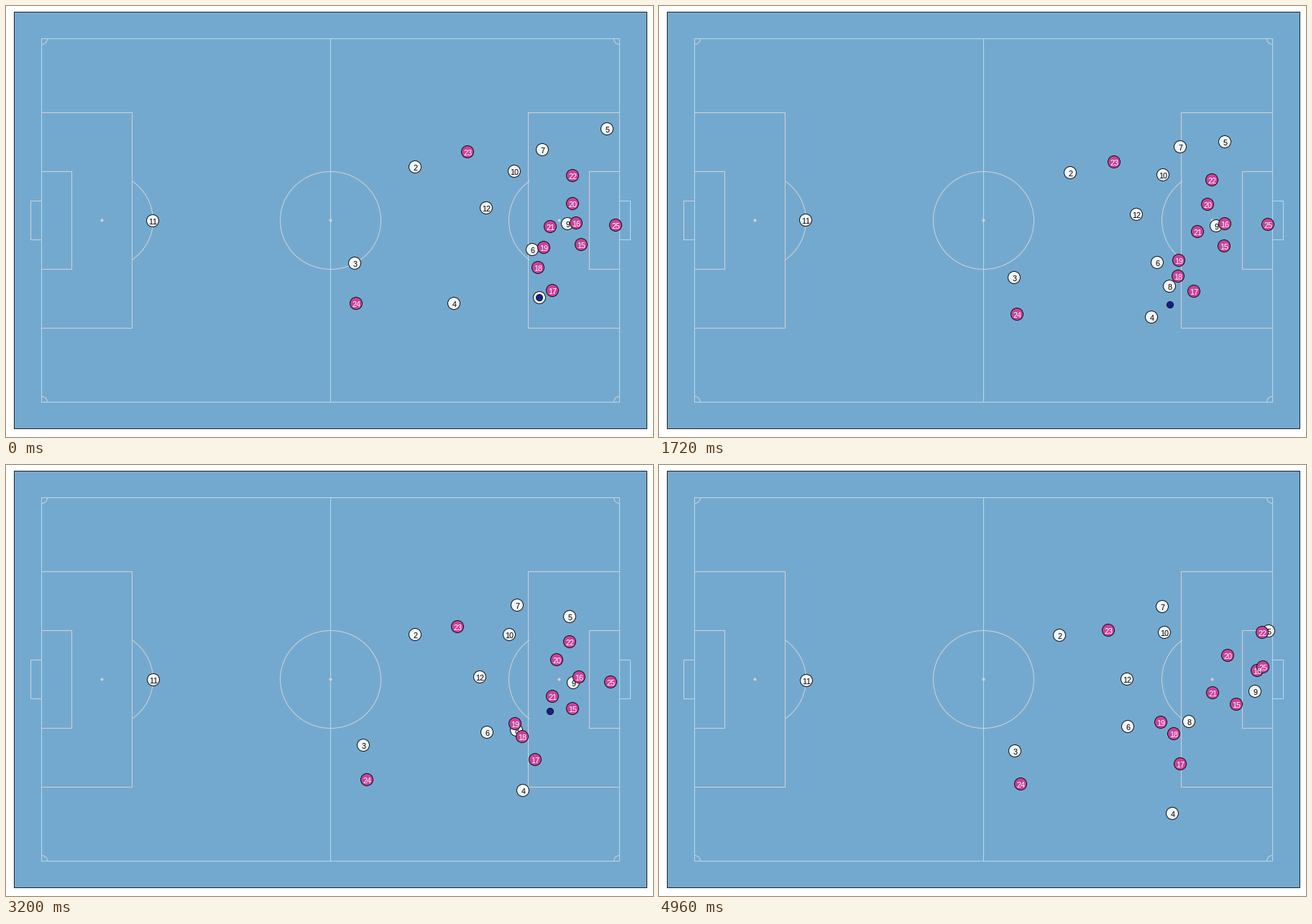
These frames come from a looping animation (900x600 px, 5 s). A matplotlib script:

```python
import matplotlib.pyplot as plt
import numpy as np
from matplotlib.animation import FuncAnimation
from matplotlib.patches import Arc, Circle, Rectangle

plt.rcParams["font.family"] = "Liberation Sans"
plt.rcParams["text.hinting"] = "native"
plt.rcParams["text.hinting_factor"] = 1

W, H, DPI = 900, 600, 100
FRAMES, INTERVAL = 125, 40
PX = 72 / DPI

GRASS = "#74a9cf"
GREY = "#d3d3d3"
PALE = "#b4dcee"
WHITE = "#f1f6fb"
PINK = "#c9429b"
NAVY = "#14208c"
EDGE = "#101010"

# Shirt number -> waypoints, passed at equal intervals over the loop.
ATTACK = {
    2: [(569, 224), (571, 234), (557, 237)],
    3: [(485, 358), (496, 385), (495, 398)],
    4: [(623, 414), (683, 432), (720, 455), (714, 485)],
    5: [(836, 171), (801, 184), (776, 199), (799, 220), (848, 231)],
    6: [(732, 339), (694, 356), (668, 373), (652, 364)],
    7: [(746, 200), (717, 195), (700, 197)],
    8: [(742, 406), (711, 391), (711, 368), (737, 357)],
    9: [(781, 303), (775, 306), (791, 303), (829, 315)],
    10: [(707, 230), (700, 236), (703, 233)],
    11: [(204, 298.7), (204.45, 298.5), (205, 299.8)],
    12: [(668, 281), (661.5, 292.5), (651, 298)],
}
DEFENCE = {
    15: [(800, 332), (786, 333.5), (789, 339.5), (803, 333)],
    16: [(793, 302), (790, 302), (787, 301), (808, 290), (832, 286)],
    17: [(760, 396), (744, 397), (735, 411), (725, 416)],
    18: [(740, 364), (722, 376), (718, 378), (716, 374)],
    19: [(748, 336), (714, 358), (698, 358)],
    20: [(788, 275), (763, 276), (767, 270.5), (791, 265)],
    21: [(757, 307), (749, 314), (761, 322), (770, 317)],
    22: [(788, 236), (769, 242), (786, 246), (839, 233)],
    23: [(642, 203), (630, 221.5), (625, 230)],
    24: [(487, 414), (500.5, 434), (503, 444)],
    25: [(848, 305), (847, 303.5), (841, 301), (840, 281)],
}

fig = plt.figure(figsize=(W / DPI, H / DPI), dpi=DPI, facecolor="white")
ax = fig.add_axes([0, 0, 1, 1])
ax.set_xlim(0, W)
ax.set_ylim(H, 0)
ax.axis("off")


# ---------- pitch ----------
def box(x0, y0, x1, y1, edge, face="none"):
    ax.add_patch(Rectangle((x0 + 0.5, y0 + 0.5), x1 - x0, y1 - y0, facecolor=face,
                           edgecolor=edge, linewidth=PX, snap=False, zorder=1))


def arc(x, y, rx, ry, start=0, end=360):
    ax.add_patch(Arc((x + 0.5, y + 0.5), 2 * rx, 2 * ry, theta1=start, theta2=end,
                     color=GREY, linewidth=PX, zorder=1))


def draw_pitch():
    box(11, 8, 891, 588, "#202020", GRASS)
    box(49, 148, 175, 448, GREY)
    box(726, 148, 853, 448, GREY)
    box(49, 230, 91, 366, GREY)
    box(811, 230, 853, 366, GREY)
    box(34, 271, 49, 325, GREY)
    box(853, 271, 868, 325, PALE)
    box(49, 45, 853, 551, PALE)
    ax.plot([451.5, 451.5], [45.5, 551.5], color=PALE, linewidth=PX, snap=False, zorder=1)
    arc(451, 298, 70, 68)
    arc(133, 298, 71, 68, -53, 53)
    arc(769, 298, 70, 68, 127, 233)
    for i, (x, y) in enumerate([(49, 45), (853, 45), (853, 551), (49, 551)]):
        arc(x, y, 8, 8, 90 * i, 90 * i + 90)
    for x in (133, 451, 769):
        ax.add_patch(Circle((x + 0.5, 298.5), 2, color=GREY, linewidth=0, zorder=1))


# ---------- motion ----------
def run(points):
    """Polynomial path through evenly timed points, one row per frame."""
    n = len(points)
    coeffs = np.polyfit(np.linspace(0, 1, n), points, n - 1)
    t = np.linspace(0, 1, FRAMES)
    return np.column_stack([np.polyval(c, t) for c in coeffs.T])


def ball_run(dribbler, keeper):
    """Dribble, pass, cross, header: straight lines between touches."""
    path = dribbler.copy()
    touches = [31, 57, 59, 104, 118]
    spots = np.array([dribbler[31], (705, 438), (705, 439), (816, 233), keeper[118]])
    for axis in (0, 1):
        path[31:119, axis] = np.interp(np.arange(31, 119), touches, spots[:, axis])
    path[119:] = keeper[119:]
    return path


def disc(radius, color, z):
    return ax.add_patch(Circle((0, 0), radius, facecolor=color, edgecolor=EDGE,
                               linewidth=PX, zorder=z))


def make_team(runs, color, ink, z):
    team = []
    for number, points in runs.items():
        label = ax.text(0, 0, str(number), color=ink, fontsize=11 * PX,
                        ha="center", va="baseline", zorder=z + 1)
        team.append((disc(8.5, color, z), label, np.round(run(points))))
    return team


draw_pitch()
players = make_team(ATTACK, WHITE, "black", 2) + make_team(DEFENCE, PINK, "white", 5)
ball = disc(4.5, NAVY, 4)
ball_path = np.round(ball_run(run(ATTACK[8]), run(DEFENCE[25])))


def update(frame):
    for patch, label, path in players:
        x, y = path[frame]
        patch.center = (x, y)
        label.set_position((x + 0.5, y + 5))
    ball.center = tuple(ball_path[frame])
    return []


anim = FuncAnimation(fig, update, frames=FRAMES, interval=INTERVAL,
                     repeat=True, repeat_delay=0, blit=False)
plt.show()
```
